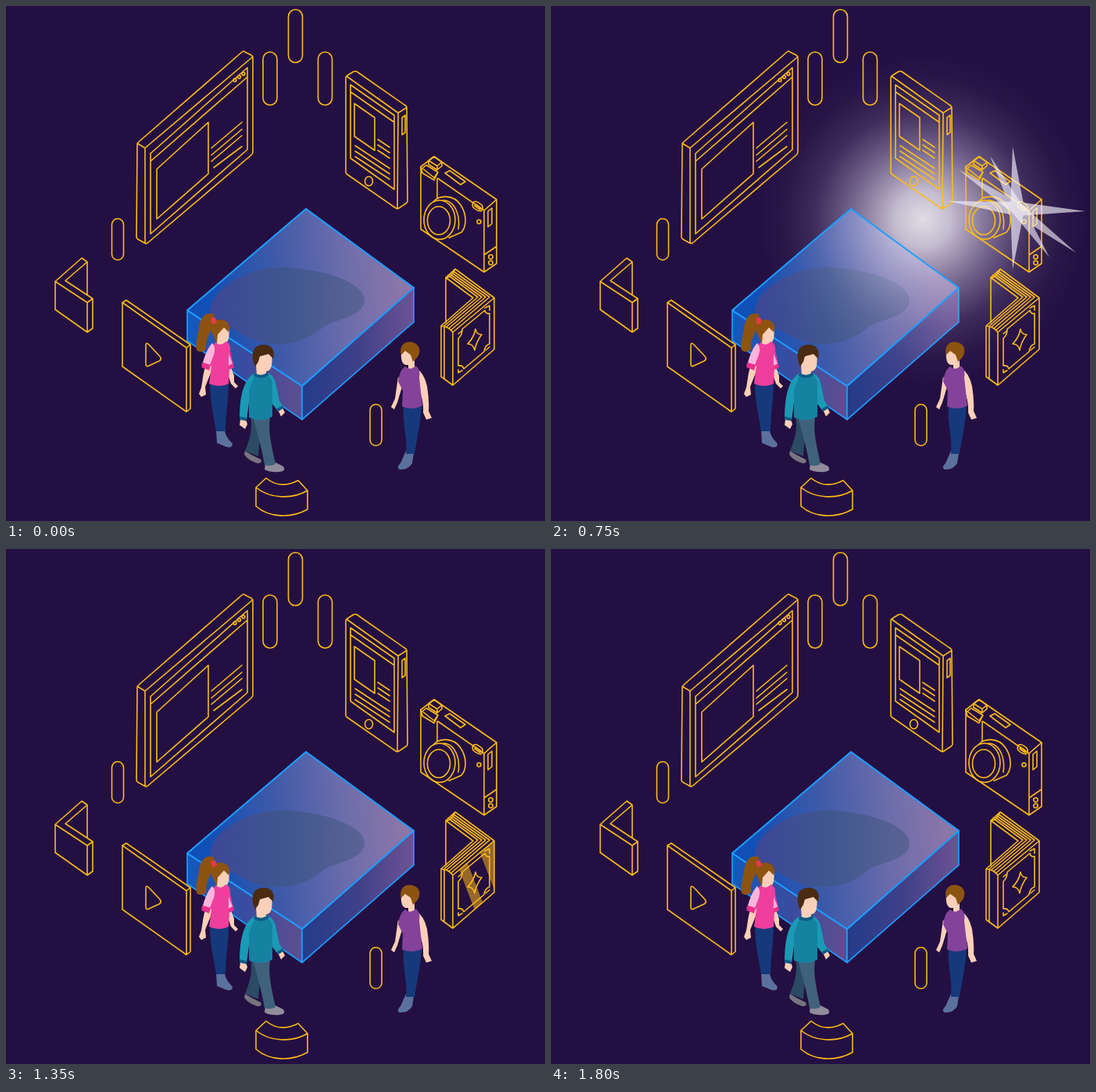
These frames come from a looping animation (690x660 px, 1830 ms). An HTML page:

```html
<!DOCTYPE html>
<html lang="en">
<head>
<meta charset="utf-8">
<title>Isometric devices</title>
<style>
  html, body { margin: 0; width: 100%; height: 100%; overflow: hidden; background: #240f42; }
  svg { display: block; width: 690px; height: 660px; }
  .line { fill: none; stroke: #fdbb16; stroke-width: 1.6; stroke-linejoin: round; stroke-linecap: round; }
  .edge { stroke: #1e9bff; stroke-width: 1.7; stroke-linejoin: round; }
  .shine { fill: #fdbb16; opacity: .52; }
  .skin { fill: #fbd0b8; }
  .jeans { fill: #15397b; }
  .boot { fill: #5b719d; }
  .hair { fill: #8d5310; }
</style>
</head>
<body>
<svg viewBox="0 0 690 660">
  <defs>
    <linearGradient id="top" gradientUnits="userSpaceOnUse" x1="255" y1="372" x2="505" y2="352">
      <stop offset="0" stop-color="#0f4fb6"/>
      <stop offset=".35" stop-color="#3c59a9"/>
      <stop offset=".7" stop-color="#6a6cab"/>
      <stop offset="1" stop-color="#8b76a9"/>
    </linearGradient>
    <linearGradient id="left">
      <stop offset="0" stop-color="#1259bd"/>
      <stop offset=".5" stop-color="#394c9f"/>
      <stop offset="1" stop-color="#604d91"/>
    </linearGradient>
    <linearGradient id="right">
      <stop offset="0" stop-color="#243b8a"/>
      <stop offset=".5" stop-color="#3f4089"/>
      <stop offset="1" stop-color="#6c5393"/>
    </linearGradient>
    <linearGradient id="pool">
      <stop offset="0" stop-color="#3c4797"/>
      <stop offset=".5" stop-color="#3f578f"/>
      <stop offset="1" stop-color="#5c6395"/>
    </linearGradient>
    <radialGradient id="light">
      <stop offset="0" stop-color="#fff" stop-opacity=".86"/>
      <stop offset=".17" stop-color="#f4f0fa" stop-opacity=".77"/>
      <stop offset=".42" stop-color="#ddd5ec" stop-opacity=".45"/>
      <stop offset=".66" stop-color="#c8bce0" stop-opacity=".16"/>
      <stop offset=".85" stop-color="#c0b2da" stop-opacity=".04"/>
      <stop offset="1" stop-color="#c0b2da" stop-opacity="0"/>
    </radialGradient>
    <clipPath id="panelClip"><path d="M149 380L154 377L236 434V516L231 520L149 462Z"/></clipPath>
    <clipPath id="coverClip"><path d="M572 418L625 374V440L572 486Z"/></clipPath>
    <clipPath id="boxClip"><path d="M384 260L522 361V405L379 530L232 429V390Z"/></clipPath>
    <g id="bands" class="shine">
      <rect x="-24" y="-60" width="24" height="200"/>
      <rect x="-59" y="-60" width="14" height="200"/>
    </g>
  </defs>

  <rect width="690" height="660" fill="#240f42"/>
  <circle class="glow" cx="476" cy="273" r="212" fill="url(#light)"/>

  <!-- platform -->
  <path class="edge" fill="url(#left)" d="M232 390L379 487V530L232 429Z"/>
  <path class="edge" fill="url(#right)" d="M522 361V405L379 530V487Z"/>
  <path class="edge" fill="url(#top)" d="M384 260L522 361L379 487L232 390Z"/>
  <path fill="url(#pool)" d="M261 388C268 355 320 332 360 335C410 338 460 355 459 378C457 398 425 401 408 410C392 424 372 434 345 433C315 432 305 420 285 412C268 405 259 398 261 388Z"/>
  <g clip-path="url(#boxClip)"><g opacity=".78">
    <circle class="glow" cx="476" cy="273" r="212" fill="url(#light)"/>
  </g></g>
  <path class="edge" fill="none" d="M232 390L384 260L522 361L379 487Z"/>

  <g clip-path="url(#panelClip)"><use href="#bands" id="panelShine"/></g>
  <g clip-path="url(#coverClip)"><use href="#bands" id="coverShine"/></g>

  <g class="line">
    <g id="pills"></g>

    <!-- monitor -->
    <path d="M168 178Q168 176 170 174L302 59Q304 57 306 59L314 63Q316 64 316 67V187Q316 189 314 191L182 303Q180 305 178 304L169 299Q167 298 167 296ZM168 176L178 182L316 65M178 182V304"/>
    <path d="M185 189L309 79V184L185 292ZM185 199L309 91M193 209L259 149V215L193 273Z"/>
    <path d="M263 182L302 149M263 191L302 158M263 199L302 166M266 207L302 180"/>
    <circle cx="293" cy="95" r="1.9"/><circle cx="298.500" cy="91" r="1.9"/><circle cx="304" cy="87" r="1.9"/>

    <!-- phone -->
    <path d="M435 92Q435 90 437 89L445 84Q447 83 449 84L512 128Q513 129 513 131L514 250Q514 252 512 253L503 259Q501 260 499 259L437 216Q435 215 435 213ZM436 90L502 137L513 130M502 137L501 260"/>
    <path d="M441 101L497 140V235L441 195ZM441 110L497 149M446 125L472 143V185L446 167Z"/>
    <path d="M476 171L491 181M476 178L491 188M476 185L491 195M447 179L491 208M447 186L491 215M447 193L491 222"/>
    <path d="M507 143L511 140V162L507 165Z"/>
    <ellipse cx="464.500" cy="224.500" rx="5" ry="6"/>

    <!-- camera -->
    <path d="M531 206L548 193L628 248V330L612 341L531 286ZM553 221L612 262V341M612 262L628 248M612 319L628 308"/>
    <path d="M541 198L548 193L558 200L552 205ZM541 198V203L552 210V205M558 200V205L552 210M533 208L538 204L553 213L548 220ZM531 206L533 214L548 223L553 213M552 221V246"/>
    <path d="M562 214L568 211L588 225L582 229ZM617 263L622 259V279L617 283Z"/>
    <path d="M599 251Q602 249 609 255Q612 259 608 263Q604 263 598 258Q596 253 599 251ZM601 254L607 258V261L600 256Z"/>
    <circle cx="605.500" cy="276.500" r="2.500"/><circle cx="620.500" cy="321.500" r="2.700"/><circle cx="620.500" cy="329" r="2.700"/>
    <ellipse cx="555" cy="274" rx="20" ry="25"/><ellipse cx="554" cy="275" rx="14.500" ry="18"/>
    <path d="M547 251C554 242 573 241 582 255C590 267 590 282 583 290L567 297M560 249C573 249 582 266 579 286"/>

    <!-- book -->
    <path d="M563 348L575 337L625 374V440L572 486L557 475V410L598 374L563 348V406M557 410Q567 411 572 418L625 374M572 418V486M563 348Q570 349 575 337"/>
    <path d="M566 345L604 373L561 410M569 344L609 373L564 411M571 342L614 373L567 413M573 340L619 373L570 415M561 411V477"/>
    <path d="M584 414L613 390Q614 395 619 394V433Q613 435 612 443L586 465Q585 460 579 461V426Q584 422 584 414ZM579 420L584 416M613 387L619 384V390M579 466V470L584 467M614 441L619 437"/>
    <path d="M601 414Q602 421 609 421Q602 430 600 441Q598 433 591 433Q599 425 601 414Z"/>

    <!-- bracket -->
    <path d="M63 353L97 323L104 328V370M104 328L76 352L111 375V413L104 418L63 389V353L104 380L111 375M104 380V418"/>

    <!-- video panel -->
    <path d="M149 380L154 377L236 434V516L231 520L149 462ZM149 380L231 438L236 434M231 438V520"/>
    <path d="M179 435Q179 430 183 434L197 449Q200 453 196 455L183 461Q179 463 179 459Z"/>

    <!-- arc -->
    <path d="M320 617L333 605Q351 620 374 608L386 621C365 633 337 631 320 617V641C337 656 365 657 386 645V621"/>
  </g>

  <!-- girl with ponytail -->
  <path class="hair" d="M266 395C254 391 249 400 247 413C245 425 242 434 244 441Q250 446 256 440C255 428 262 416 267 406Z"/>
  <path class="skin" d="M258 455C252 468 252 480 250 489L247 497L250 501L256 498L255 488L265 463ZM285 455L292 474V482L297 487L294 490L288 484L282 466Z"/>
  <path class="skin" d="M269 410H285C287 426 284 432 280 432V438L270 440Z"/>
  <path class="hair" d="M263 418C259 407 266 401 276 402C284 403 288 409 285 418L279 412L271 421L270 432Z"/>
  <path fill="#e63a46" d="M262 400L268 399L270 406L264 408Z"/>
  <path class="boot" d="M269 543H280Q280 551 290 561Q290 567 282 565L270 560Z"/>
  <path class="jeans" d="M261 481L285 483C285 503 281 525 281 545H269C266 526 261 508 261 481Z"/>
  <path fill="#ef3f9d" d="M268 431Q275 437 281 430Q288 432 287 442L291 460L286 465L285 484Q273 490 260 484L263 461L257 464L250 460Z"/>
  <path fill="#fbb5dc" d="M264 432Q269 437 266 447L261 460L252 457Q257 439 264 432ZM285 446L290 458L285 461Z"/>
  <path fill="#e7308c" d="M252 457L262 460L260 467L250 463ZM285 461L291 459L292 463L286 466Z"/>

  <!-- boy -->
  <path class="skin" d="M300 530L307 529L309 536L306 542L299 537ZM347 515L353 513L357 521L352 526Z"/>
  <path fill="#78747f" d="M306 570L314 575L326 581Q329 586 322 586Q311 583 305 575Z"/>
  <path fill="#2b4a63" d="M313 527L328 529C326 548 324 562 323 577L306 570C312 556 316 541 313 527Z"/>
  <path fill="#908c9c" d="M332 586L343 584L355 590Q359 596 350 597Q339 598 331 594Z"/>
  <path fill="#40617c" d="M316 527L338 528C335 546 341 567 345 587Q338 591 331 588C328 571 323 551 316 527Z"/>
  <path class="skin" d="M319 443H340C342 462 339 468 333 468V474H321Z"/>
  <path fill="#4a2b12" d="M319 462C312 446 316 434 330 434C340 434 345 441 342 452L336 446L325 449L323 456Z"/>
  <path fill="#1b9ab5" d="M319 470Q327 479 335 470Q344 474 346 487L350 506L355 514L348 519L341 510L341 526Q326 534 311 527V508L308 531L299 529C299 507 302 479 319 470Z"/>
  <path fill="#1482a0" d="M319 472Q327 479 335 472L341 481V526Q326 534 311 527V492Z"/>
  <path fill="#0d5b86" d="M318 470Q327 476 335 469L336 473Q327 480 317 474ZM299 526L308 528V532L299 530ZM347 516L354 512L356 515L348 520Z"/>

  <!-- woman -->
  <path class="skin" d="M502 475L507 488L501 508L497 517L493 514L498 503ZM526 465Q535 470 539 487Q542 506 541 519L545 528L538 530L534 521Q535 505 528 491Z"/>
  <path class="skin" d="M506 438H523V464L515 467V460C508 461 505 455 506 443Z"/>
  <path class="hair" d="M505 443C505 433 512 429 520 431C530 433 532 443 526 451L521 456L518 447L511 442L506 447Z"/>
  <path class="boot" d="M512 570L522 573L520 586Q514 595 504 594Q499 592 505 586Z"/>
  <path class="jeans" d="M509 511L532 512C531 534 526 554 523 574H512C514 551 507 536 509 511Z"/>
  <path fill="#85429b" d="M511 462Q518 468 524 461Q531 465 529 476L533 512Q520 519 507 513L508 493L502 481Q504 466 511 462Z"/>

  <g id="star" fill="#f7f5fc"></g>
</svg>
<script>
const LOOP = 1830, STEP = 30;
const $ = id => document.getElementById(id);

const pills = [[361.5, 4.5, 18, 68], [329, 59, 18, 68], [399.5, 59, 18, 68], [135.5, 272.5, 15, 53], [466, 510.5, 15, 53]];
$('pills').innerHTML = pills.map(([x, y, w, h]) =>
  `<rect x="${x}" y="${y}" width="${w}" height="${h}" rx="${w / 2}"/>`).join('');

// A ray is a thin triangle from the centre to its tip.
function ray([x, y], half) {
  const len = Math.hypot(x, y), px = -y / len * half, py = x / len * half;
  return `M${px} ${py}L${-px} ${-py}L${x} ${y}Z`;
}
const starPath = (tips, half, alpha) =>
  `<path opacity="${alpha}" d="${tips.map(p => ray(p, half)).join('')}"/>`;
$('star').innerHTML =
  starPath([[-6, -80], [87, 3], [-6, 78], [-89, -10]], 9, .64) +
  starPath([[-75, -50], [75, 56], [-35, -68], [41, 62]], 8, .6);

const panelShine = $('panelShine'), coverShine = $('coverShine'), star = $('star');
const glows = document.querySelectorAll('.glow');

function sweep(el, x, slant) {
  el.setAttribute('transform', `translate(${x} 408) skewX(${slant})`);
}

// Quick rise, then a hard cut.
function flash(t, start) {
  const p = (t - start) / 60;
  return p < 0 || t >= start + 90 ? 0 : Math.min(1, .4 + .6 * p);
}

function draw(now) {
  const t = Math.floor(now % LOOP / STEP) * STEP;
  sweep(panelShine, 149 + .33 * (t - 330), 16.5);
  sweep(coverShine, 638 + .33 * (t - 1350), 21);
  const power = Math.max(flash(t, 690), flash(t, 1530));
  glows.forEach(g => g.setAttribute('opacity', power));
  star.setAttribute('opacity', power);
  star.setAttribute('transform', `translate(597 260) scale(${power})`);
}

const start = performance.now();
function tick() {
  draw(performance.now() - start);
  requestAnimationFrame(tick);
}
tick();
</script>
</body>
</html>
```
